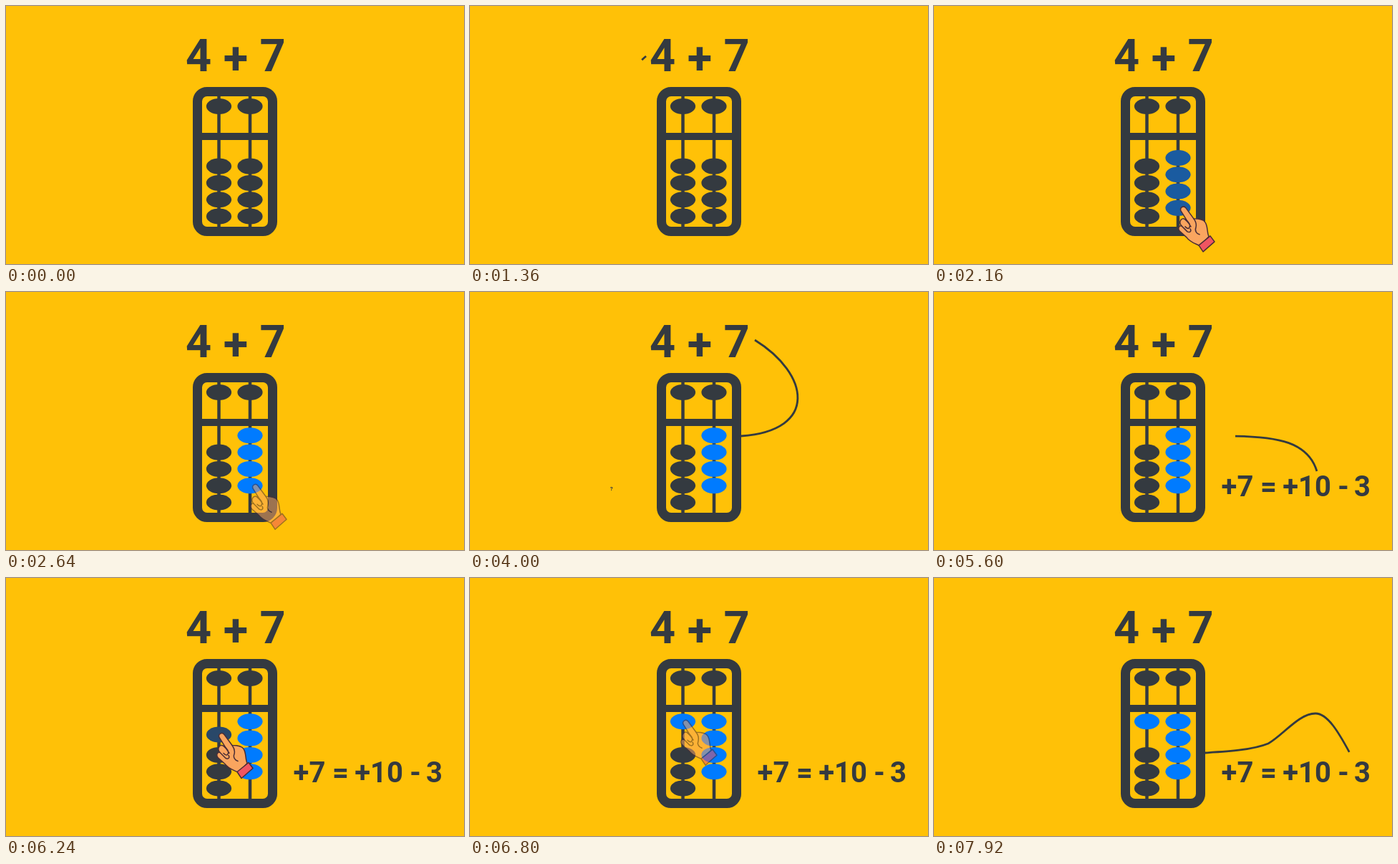
An HTML page for the animation above (8000 ms loop, 640 by 360 pixels).

```html
<!DOCTYPE html>
<html lang="en">
<head>
<meta charset="utf-8">
<title>Abacus addition</title>
<style>
  html, body { margin: 0; width: 100%; height: 100%; overflow: hidden; background: #ffc107; }
  svg { display: block; width: 100%; height: 100%; }
  text { font-family: Roboto, "Open Sans", sans-serif; font-weight: 700; fill: #343a40; text-anchor: middle; }
  .title { font-size: 63px; }
  .formula { font-size: 40px; }
  .line { fill: none; stroke: #343a40; }
  .arc { stroke-width: 2.8; }
  .hand { stroke: #4a2d35; stroke-width: 1.5; stroke-linejoin: round; stroke-linecap: round; }
</style>
</head>
<body>
<svg viewBox="0 0 640 360">
  <defs>
    <g id="hand" class="hand">
      <path fill="#faa55f" d="M-1 5C-3 0 3 -3 6 1L17 16C22 16 30 16 33 21C37 27 35 34 38 41L26 54C18 50 12 49 7 42L-3 33C-6 29 -3 25 0 26C-5 21 0 13 5 17L9 21Z"/>
      <path fill="none" d="M9 21L13 27M0 26L8 34M5 17C10 20 13 25 11 28C10 31 7 29 5 27M17 16C20 20 21 24 20 28M8 34C12 36 14 33 12 30M20 28C18 33 21 37 25 38"/>
      <path fill="#ef5562" d="M24 53L40 40L46 48L30 62Z"/>
    </g>
  </defs>

  <g class="title">
    <text x="269" y="91">4</text><text x="321" y="95">+</text><text x="372.5" y="91">7</text>
  </g>

  <g class="line">
    <path stroke-width="4.5" d="M297.5 120V314M341 120V314"/>
    <path stroke-width="10" d="M268 182H372"/>
    <rect x="267.5" y="119.5" width="105" height="195" rx="13.5" stroke-width="13"/>
  </g>
  <g id="beads"></g>
  <g id="arcs"></g>

  <g id="question"><text class="title" x="18" y="0">?</text></g>
  <g id="formula" class="formula">
    <text x="-79" y="-2">+7</text><text x="-35.5" y="-2">=</text><text x="18" y="-2">+10</text>
    <text x="69" y="-2">-</text><text x="95.5" y="-2">3</text>
  </g>
  <use id="onesHand" href="#hand"/>
  <use id="tensHand" href="#hand"/>
</svg>

<script>
const LOOP = 8000, STEP = 80, BEAD_GAP = 23.3;
const DARK = [52, 58, 64], BLUE = [0, 123, 255];
const byId = id => document.getElementById(id);

function add(parent, tag, attributes) {
  const node = document.createElementNS("http://www.w3.org/2000/svg", tag);
  for (const name in attributes) node.setAttribute(name, attributes[name]);
  return parent.appendChild(node);
}

const progress = (t, from, to) => Math.min(1, Math.max(0, (t - from) / (to - from)));
const easeInOut = (u, power) => u < .5 ? (2 * u) ** power / 2 : 1 - (2 - 2 * u) ** power / 2;
const smooth = u => u * u * (3 - 2 * u);
const mix = u => `rgb(${DARK.map((c, i) => Math.round(c + (BLUE[i] - c) * u))})`;

function addBead(cx, cy) {
  return add(byId("beads"), "ellipse", { cx, cy, rx: 17.6, ry: 11, fill: mix(0) });
}

function addColumn(x) {
  addBead(x, 140);
  return [0, 1, 2, 3].map(i => addBead(x, 223.6 + i * BEAD_GAP));
}

const tens = addColumn(297.5), ones = addColumn(341);

// Each push slides a group of beads up under a pointing hand.
const pushes = [
  { beads: ones, hand: byId("onesHand"), x: 346, y: 292.5, start: 1960 },
  { beads: tens.slice(0, 1), hand: byId("tensHand"), x: 299, y: 222.5, start: 6120 }
];

const arcs = [
  { d: "M246 70C186 122 180 196 262 201", draw: 1270, erase: 1840, end: 2160 },
  { d: "M398 67C474 114 488 193 379 201", draw: 3510, erase: 4160, end: 4560 },
  { d: "M535 250C520 200 460 201 379 201", draw: 5350, erase: 5920, end: 6240 },
  { d: "M588 257C571 226 553 189 533 189C510 189 488 219 467 231C445 240 410 242 379 244",
    draw: 7270, erase: 7840, end: 8160 }
];
for (const arc of arcs)
  arc.node = add(byId("arcs"), "path", { d: arc.d, class: "line arc", pathLength: 1 });

function drawPush({ beads, hand, x, y, start }, t) {
  const moved = smooth(progress(t, start, start + 400));
  const lift = -BEAD_GAP * moved;
  for (const bead of beads) {
    bead.setAttribute("transform", `translate(0 ${lift})`);
    bead.setAttribute("fill", mix(moved));
  }
  hand.setAttribute("transform", `translate(${x} ${y + lift})`);
  hand.setAttribute("opacity",
    progress(t, start - 160, start) * (1 - progress(t, start + 540, start + 840)));
}

function drawArc({ node, draw, erase, end }, t) {
  const head = easeInOut(progress(t, draw, draw + 410), 3);
  const tail = easeInOut(progress(t, erase, end), 3);
  node.setAttribute("visibility", head > tail ? "visible" : "hidden");
  node.setAttribute("stroke-dasharray", `0 ${tail} ${head - tail} 2`);
}

function drawPop(id, x, y, t, start, end) {
  const scale = t < end ? easeInOut(progress(t, start, start + 320), 2) : 0;
  byId(id).setAttribute("visibility", scale ? "visible" : "hidden");
  byId(id).setAttribute("transform", `translate(${x} ${y}) scale(${scale})`);
}

function render(now) {
  const t = Math.floor((now % LOOP) / STEP) * STEP;
  pushes.forEach(push => drawPush(push, t));
  arcs.forEach(arc => drawArc(arc, t));
  drawPop("question", 195.5, 277, t, 3920, 4960);
  drawPop("formula", 503, 287, t, 4880, LOOP);
}

const startTime = performance.now();
function tick() {
  render(performance.now() - startTime);
  requestAnimationFrame(tick);
}
tick();
</script>
</body>
</html>
```
